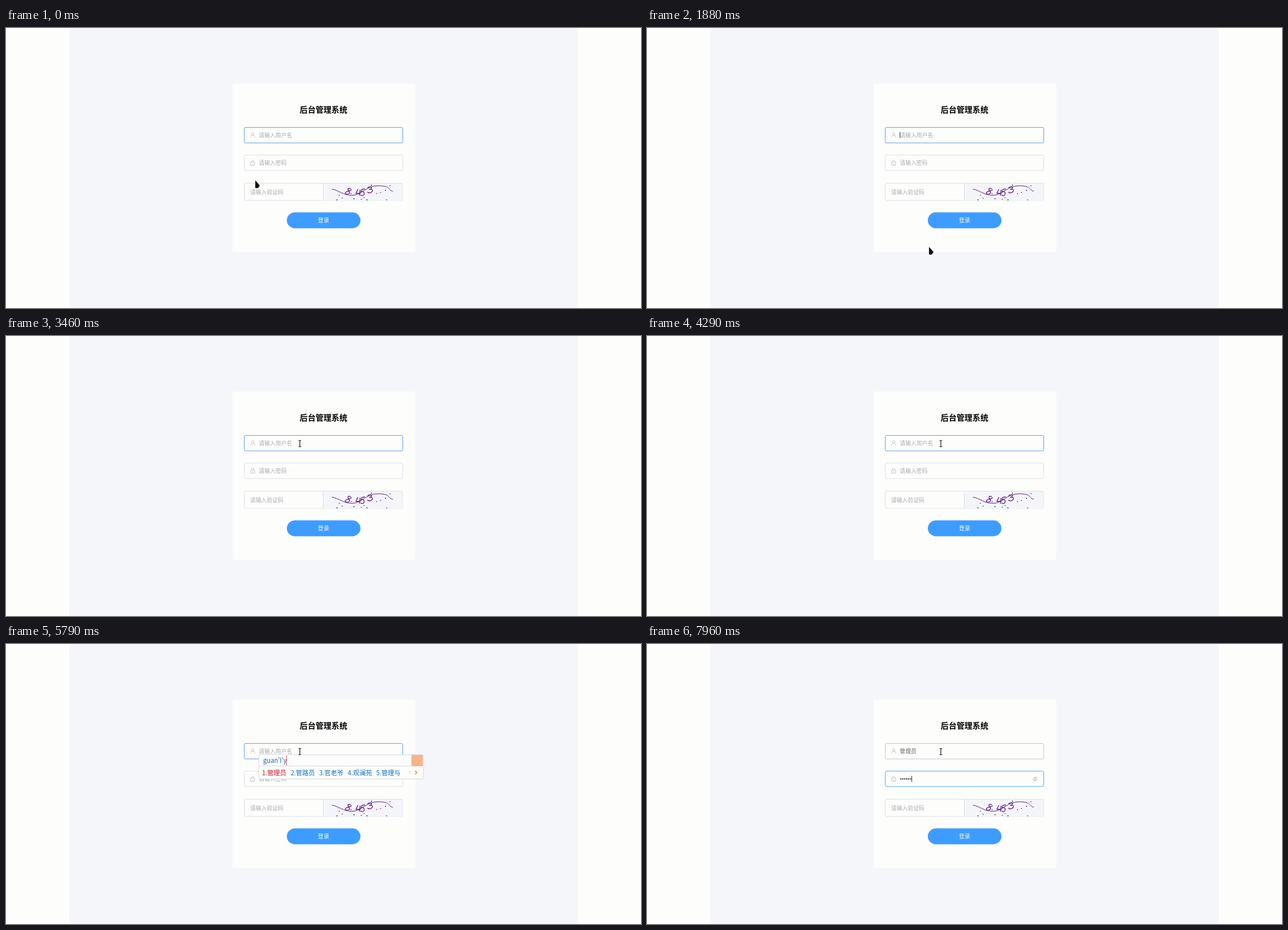
These frames come from a looping animation (1126x497 px, 8 s). An HTML page:

```html
<!DOCTYPE html>
<html lang="zh-CN">
<head>
<meta charset="utf-8">
<title>后台管理系统</title>
<style>
html, body { margin: 0; width: 100%; height: 100%; overflow: hidden; background: #fdfdfc; }
svg { display: block; width: 100vw; height: 100vh; font: 9.86px "Noto Sans CJK SC", "Noto Sans CJK", "Noto Sans", sans-serif; }
.field { fill: #fdfdfc; stroke: #dcdfe6; }
.hint { fill: #a8abb2; }
.value { fill: #606266; }
.icon { fill: none; stroke: #b4b7be; stroke-width: .8; }
.ime { font-size: 11.26px; fill: #0b6fc4; }
</style>
</head>
<body>
<svg viewBox="0 0 1126 497">
  <rect x="112" width="902" height="497" fill="#f4f6f9"/>
  <rect x="401.500" y="98.500" width="324" height="299" rx="3" fill="#fdfdfc"/>
  <text x="520.800" y="150.300" font-size="14.08" font-weight="700">后台管理系统</text>

  <rect id="nameBox" class="field" x="422.500" y="176.500" width="281" height="27.500" rx="2.500"/>
  <g class="icon"><circle cx="437.500" cy="188.200" r="2.300"/><path d="M433.700 194.300c0-5 7.600-5 7.600 0"/></g>
  <text id="nameText" x="448.300" y="193.800"></text>

  <rect id="passBox" class="field" x="422.500" y="225.500" width="281" height="27.500" rx="2.500"/>
  <g class="icon"><rect x="434" y="238" width="7" height="5.500" rx=".5"/><path d="M435.500 238v-1.500c0-2.500 4-2.500 4 0v1.500M437.500 240v1.800"/></g>
  <text id="passHint" class="hint" x="448.300" y="243.300">请输入密码</text>
  <g id="dots" class="value"></g>
  <g id="eye" class="icon"><path d="M683.500 239.500q4.700-6 9.400 0q-4.700 6-9.400 0M685 243.500l6.500-8"/><circle cx="688.200" cy="239.500" r="1.600"/></g>

  <rect class="field" x="422.500" y="275.500" width="281" height="30.500" rx="2.500"/>
  <path d="M563 276h138.500q2 0 2 2v26q0 2-2 2H563z" fill="#f4f5f9"/>
  <path d="M562.500 275.500v30.500" stroke="#dcdfe6"/>
  <text class="hint" x="432.800" y="294.600">请输入验证码</text>
  <g fill="none" stroke="#5c1680">
    <path d="M578 286C590 288 598 297 614 297S638 280 660 280S676 287 686 290"/>
    <path stroke-width="1.300" d="M611.500 285.500c-4-2.500-6.500 0-4.500 2.500s4 5 0 6.500-6.500-.5-4.500-3 9-2 10.500-5M624 286l-3.500 7.500h8M628 287l-1.500 10.500M636.500 285.500l-5.500 1-1.500 4.500c4-1.500 6.500.5 5.500 4s-4.500 3-6.500 1M641 283.500c3-2.500 8-2 7 .5s-4 2.500-4 2.500c5-1.500 7.500 2 4.500 4.500s-6 2-7.500 0"/>
  </g>
  <g id="specks"></g>

  <rect x="498" y="327.300" width="130.500" height="28.200" rx="14.100" fill="#3f9cff"/>
  <text x="553.300" y="345.200" fill="#fff">登录</text>

  <path id="caret" stroke="#333"/>
  <g id="popup">
    <rect id="panel" x="448.500" y="196.500" height="43" rx="2" fill="#fdfdfc" stroke="#d4d6dc"/>
    <path id="rule" stroke="#d8d9e6"/>
    <text id="typed" class="ime" x="456" y="211.300" style="fill:#1f62b4"></text>
    <path id="imeCaret" stroke="#d8586c"/>
    <g id="words"></g>
    <g id="corner" fill="none">
      <rect x="-21" y="197" width="20" height="20" fill="#f6b38c"/>
      <path d="M-22.500 225.500l-2.500 2.500 2.500 2.500" stroke="#c4c6cc"/>
      <path d="M-14.500 225l3 3-3 3" stroke="#f07a28" stroke-width="1.500"/>
    </g>
  </g>
  <g id="arrow">
    <path d="M1 2l8 8-3 5H1z" fill="#bbb" opacity=".5"/>
    <path d="M0 .5l8 9-3 4.500H0z" fill="#111"/>
  </g>
  <g id="beam" fill="none">
    <path d="M-2.500-5.500h5M0-5.500v11M-2.500 5.500h5" stroke="#ddd" stroke-width="3"/>
    <path d="M-2.200-5.500h4.400M0-5.500v11M-2.200 5.500h4.400" stroke="#333" stroke-width="1.200"/>
  </g>
</svg>
<script>
const LOOP = 8000, COMMIT = 5860, TAB = 6350;
const $ = id => document.getElementById(id);
const show = (id, on) => $(id).style.display = on ? '' : 'none';
const place = (id, x, y) => $(id).setAttribute('transform', `translate(${x} ${y})`);
const vline = (id, x, y, h) => $(id).setAttribute('d', `M${x} ${y}v${h}`);

function add(parent, tag, attrs, text = '') {
  const el = document.createElementNS('http://www.w3.org/2000/svg', tag);
  for (const k in attrs) el.setAttribute(k, attrs[k]);
  el.textContent = text;
  $(parent).append(el);
  return el;
}

// Input method: time, typed letters, candidates
const stages = [
  [4640, 'g', '个 给 过 高 go'],
  [4800, 'gu', '古 股 顾 故 guard'],
  [4960, 'gua', '挂 刮 瓜 卦 guard'],
  [5180, 'guan', '管 关 观 官 馆'],
  [5400, "guan'l", '管理 关联 官僚 管路 关了'],
  [5620, "guan'l'y", '管理员 管路员 官老爷 观澜苑 管理与']
];
const keys = [6700, 6920, 7140, 7360, 7580, 7800];
const path = [[0, 442, 270], [200, 442, 270], [1000, 500, 388], [2200, 500, 388], [3100, 521, 191], [LOOP, 521, 191]];

[[587, 305], [596, 302], [591, 297], [617, 303], [630, 304], [635, 301], [640, 305], [657, 294],
 [664, 292], [673, 288], [681, 280], [675, 305], [648, 279], [612, 294]].forEach(([x, y], i) =>
  add('specks', 'circle', { cx: x, cy: y, r: 1, fill: i % 3 ? '#8a48b8' : '#3a2480' }));
const dots = keys.map((_, i) => add('dots', 'circle', { cx: 450 + i * 3.45, cy: 239.500, r: 1.4 }));

let shown;
function drawPopup(stage) {
  show('popup', stage);
  if (stage === shown) return;
  shown = stage;
  if (!stage) return;
  $('typed').textContent = stage[1];
  vline('imeCaret', Math.round(456 + $('typed').getComputedTextLength()) - .5, 198, 18);
  $('words').replaceChildren();
  let x = 454;
  stage[2].split(' ').forEach((word, i) => {
    const el = add('words', 'text', { class: 'ime', x, y: 233.2 }, `${i + 1}.${word}`);
    if (!i) el.style.fill = '#c4151c';
    x += el.getComputedTextLength() + 7.5;
  });
  const right = Math.round(x + 33);
  $('panel').setAttribute('width', right - 448.5);
  $('rule').setAttribute('d', `M449 216.500H${right - 22}`);
  place('corner', right, 0);
}

function drawPointer(t) {
  const i = path.findIndex(p => p[0] > t), [t0, x0, y0] = path[i - 1], [t1, x1, y1] = path[i];
  const u = (t - t0) / (t1 - t0), e = u * u * (3 - 2 * u);
  const x = x0 + (x1 - x0) * e, y = y0 + (y1 - y0) * e;
  const overText = x > 422 && (y > 176 && y < 204 || y > 225 && y < 253 || y > 275 && y < 306 && x < 563);
  show('arrow', !overText);
  show('beam', overText);
  place(overText ? 'beam' : 'arrow', x, y);
}

function draw(t) {
  const named = t >= COMMIT, onPass = t >= TAB;
  const count = keys.filter(k => k <= t).length;
  const stage = named ? undefined : stages.findLast(s => s[0] <= t);

  $('nameText').textContent = named ? '管理员' : '请输入用户名';
  $('nameText').setAttribute('class', named ? 'value' : 'hint');
  $('nameBox').style.stroke = onPass ? '#c4c5d2' : '#5e9cec';
  $('passBox').style.stroke = onPass ? '#58a4ec' : '';
  show('passHint', !count);
  show('eye', onPass);
  dots.forEach((d, i) => d.style.display = i < count ? '' : 'none');

  // The caret stays lit for half a second after each input
  const last = count ? keys[count - 1] : onPass ? TAB : named ? COMMIT : -500;
  show('caret', !stage && (t - last) % 1000 < 500);
  vline('caret', onPass ? Math.round(448 + count * 3.45) + .5 : named ? 478.5 : 448.5, onPass ? 234 : 184.5, 11);

  drawPopup(stage);
  drawPointer(t);
}

function tick() {
  draw(performance.now() % LOOP);
  requestAnimationFrame(tick);
}
tick();
</script>
</body>
</html>
```
